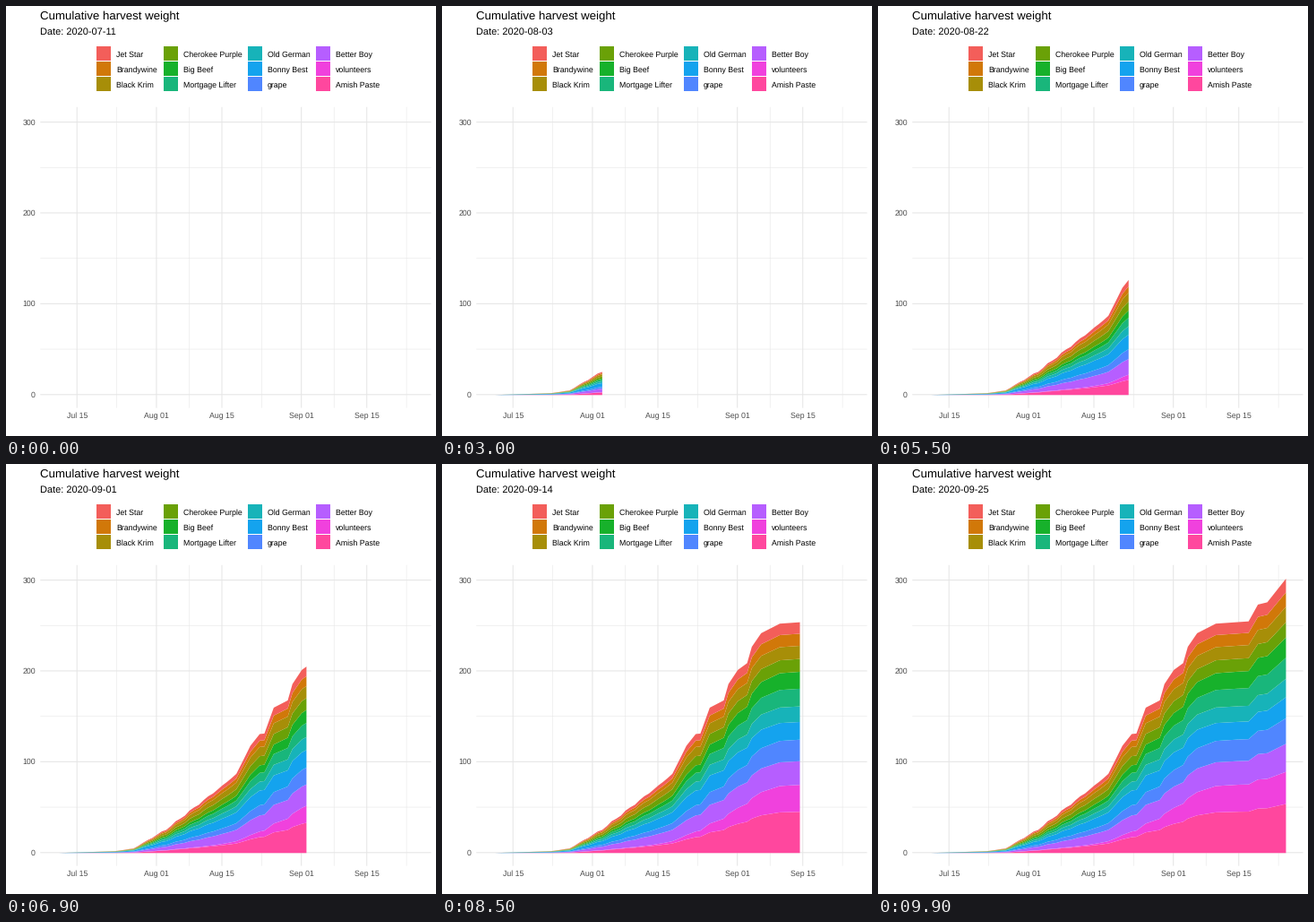
A matplotlib script for the animation above (10000 ms loop, 480 by 480 pixels).

```python
import numpy as np
import matplotlib.pyplot as plt
from matplotlib.animation import FuncAnimation
from matplotlib.patches import Rectangle

plt.rcParams.update({
    "font.family": "Liberation Sans",
    "text.hinting": "none",
    "path.snap": False,
})

SIZE, DPI, FRAMES = 480, 100, 100
LAST = FRAMES - 1
START, DAYS = np.datetime64("2020-07-11"), 76
LEFT, RIGHT, TOP, BOTTOM = 38.3, 474.5, 112.8, 448.6

# Name, colour, share of the harvest early and late; stacked from top to bottom.
VARIETIES = [
    ("Jet Star", "#F35E5A", .060, .050),
    ("Brandywine", "#D17809", .055, .053),
    ("Black Krim", "#A78E08", .090, .057),
    ("Cherokee Purple", "#6AA107", .090, .056),
    ("Big Beef", "#17B12B", .060, .074),
    ("Mortgage Lifter", "#19B67B", .075, .077),
    ("Old German", "#17B3B9", .080, .068),
    ("Bonny Best", "#14A3EE", .150, .077),
    ("grape", "#5086FF", .085, .094),
    ("Better Boy", "#B65EFF", .155, .103),
    ("volunteers", "#F041DD", .015, .118),
    ("Amish Paste", "#FF479E", .115, .180),
]
NAMES, COLORS, EARLY, LATE = zip(*VARIETIES)

# Key points of the total: (day, weight)
TOTAL = [
    (0, 0), (12, 2), (16, 5), (23, 26), (35, 74), (38, 87), (41, 118), (43, 131),
    (44, 131.5), (46, 160), (49, 168), (50, 186), (52, 201.5), (54, 209), (55, 227),
    (57, 242), (61, 252.5), (66, 254.3), (68, 255), (70, 273.5), (72, 276), (76, 302),
]


def px(day):
    return 58.35 + 5.218 * np.asarray(day)


def py(weight):
    return 433.75 - 1.014 * np.asarray(weight)


def total(day):
    """Key points plus a picking rhythm while the harvest is frequent."""
    rhythm = np.cos(2 * np.pi * (day - 30) / 3.3) * np.exp(-((day - 27) / 8) ** 2)
    return np.interp(day, *zip(*TOTAL)) - rhythm


def shares(day):
    """Early shares ease into the late ones; the first fruit is Bonny Best."""
    t = np.clip((day - 30) / 34, 0, 1)
    late = t * t * (3 - 2 * t)
    w = np.outer(EARLY, 1 - late) + np.outer(LATE, late)
    w[NAMES.index("Bonny Best")] += 2 * np.exp(-day / 5)
    return w / w.sum(axis=0)


# Daily picking at first, then only on the key days.
key_days = [day for day, _ in TOTAL]
PICKS = np.union1d(np.arange(key_days[6]), key_days)
PICK_FRAMES = np.round(PICKS * LAST / DAYS)
LAYERS = (shares(PICKS) * total(PICKS))[::-1]
EDGES = np.vstack([0 * PICKS, np.cumsum(LAYERS, axis=0)])

fig = plt.figure(figsize=(SIZE / DPI, SIZE / DPI), dpi=DPI, facecolor="white")
ax = fig.add_axes([0, 0, 1, 1])
ax.set(xlim=(0, SIZE), ylim=(SIZE, 0))
ax.axis("off")


def text(x, y, s, size, color="black", ha="left"):
    return ax.text(x, y, s, fontsize=size * 72 / DPI, color=color, ha=ha, va="baseline")


def grid(days, weights, width):
    style = dict(color="#E6E6E6", lw=width * 72 / DPI, zorder=1)
    ax.vlines(px(days), TOP, BOTTOM, **style)
    ax.hlines(py(weights), LEFT, RIGHT, **style)


def draw_axes():
    ticks = {"Jul 15": 4, "Aug 01": 21, "Aug 15": 35, "Sep 01": 52, "Sep 15": 66}
    days, weights = np.array(list(ticks.values())), np.arange(0, 301, 100)
    middles = np.append((days[1:] + days[:-1]) / 2, days[-1] + 8.5)
    grid(middles, weights[:-1] + 50, .55)
    grid(days, weights, 1.07)
    for label, day in ticks.items():
        text(px(day), 460, label, 8.8, "#4D4D4D", "center")
    for w in weights:
        text(33, py(w) + 2.9, str(w), 8.8, "#4D4D4D", "right")


def draw_legend():
    columns = (101, 176, 270, 346)
    for i, (name, color) in enumerate(zip(NAMES, COLORS)):
        x, y = columns[i // 3], 45 + 17 * (i % 3)
        ax.add_patch(Rectangle((x, y), 16, 16, fc=color, lw=0))
        text(x + 21.9, y + 12, name, 8.8)


draw_axes()
draw_legend()
text(38, 15, "Cumulative harvest weight", 13.2)
date = text(38, 32, "", 11)
bands = []


def update(frame):
    date.set_text(f"Date: {START + DAYS * frame // LAST}")
    while bands:
        bands.pop().remove()
    if frame == 0:
        return
    # Each pick lands on a whole frame; the front moves evenly in between.
    now = np.interp(frame, PICK_FRAMES, PICKS)
    days = np.append(PICKS[PICKS < now], now)
    edges = [py(np.interp(days, PICKS, e)) for e in EDGES]
    for low, high, color in zip(edges, edges[1:], reversed(COLORS)):
        bands.append(ax.fill_between(px(days), low, high, color=color, lw=0, zorder=2))


anim = FuncAnimation(fig, update, frames=FRAMES, init_func=lambda: update(0),
                     interval=1000 // 10, repeat=True, repeat_delay=0)
plt.show()
```
